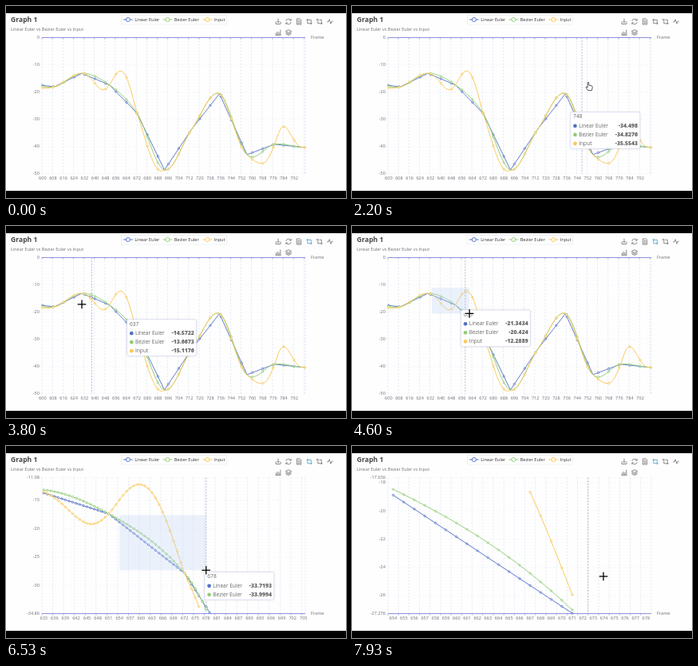
These frames come from a looping animation (426x240 px, 8 s). An HTML page with a canvas:

```html
<!DOCTYPE html>
<html lang="en">
<head>
<meta charset="utf-8">
<title>Graph 1</title>
<style>
html, body { margin: 0; width: 100%; height: 100%; overflow: hidden; background: #000; }
canvas { display: block; width: 426px; height: 240px; }
</style>
</head>
<body>
<canvas id="stage"></canvas>
<script>
const W = 426, H = 240, LOOP = 8000;
const L = 45, R = 375, T = 39.5, B = 209.5;
const FONT = '"Open Sans", "Noto Sans", sans-serif';
const BLUE = '#5470c6', GREEN = '#91cc75', YELLOW = '#fac858', GREY = '#6e7079';
const AXIS = '#8f92dc', SPLIT = '#d6def2', EDGE = '#c4c9ea';

const canvas = document.getElementById('stage');
const dpr = window.devicePixelRatio || 1;
canvas.width = W * dpr;
canvas.height = H * dpr;
const c = canvas.getContext('2d');

// Key values every 21 frames; straight lines and a spline join them.
const FIRST = 588, GAP = 21;
const keys = [-16.929, -18.0779, -13.157, -17.4026, -27.7472, -48.6496,
  -33.55, -20.6, -43.0506, -39.2, -40.3, -40.5];
const key = i => keys[Math.max(0, Math.min(keys.length - 1, i))];

function locate(frame) {
  const u = (frame - FIRST) / GAP, i = Math.floor(u);
  return [i, u - i];
}

function linear(frame) {
  const [i, t] = locate(frame);
  return key(i) + (key(i + 1) - key(i)) * t;
}

function bezier(frame) {
  const [i, t] = locate(frame), s = 1 - t;
  const slope = k => (key(k + 1) - key(k - 1)) / 2;
  return key(i) + (key(i + 1) - key(i)) * t * t * (3 - 2 * t) + slope(i) * t * s * s - slope(i + 1) * t * t * s;
}

// The input swings away from the spline between some keys.
const swings = {
  0: { size: -0.5 },
  1: { size: 0.2696 },
  2: { size: -3.625, skew: 1.85 },
  3: { size: 8.802, sharp: 1.1 },
  4: { size: -3.6 },
  7: { size: -0.7806 },
  8: { size: -4.6, skew: 1.7 },
  9: { size: 6.5, skew: 0.65, sharp: 2 }
};

function input(frame) {
  const [i, t] = locate(frame);
  const { size = 0, skew = 1, sharp = 1 } = swings[i] || {};
  return bezier(frame) + size * Math.pow(Math.sin(Math.PI * Math.pow(t, skew)), sharp);
}

const frames = Array.from({ length: 201 }, (_, i) => 600 + i);
const series = [
  { name: 'Linear Euler', color: BLUE, legend: 147, value: linear },
  { name: 'Bezier Euler', color: GREEN, legend: 196.5, value: bezier },
  { name: 'Input', color: YELLOW, legend: 246.5, value: input }
];

const views = [
  { at: 0, from: 600, to: 801, top: 0, bottom: -50, tick: 10, step: 8, marks: 8 },
  { at: 5160, grab: 4250, from: 633, to: 706, top: -11.08, bottom: -34.86, tick: 5, step: 3, marks: 1 },
  { at: 6700, grab: 6000, from: 654, to: 679, top: -17.636, bottom: -27.276, tick: 2, step: 1, marks: 1 }
];

function scale({ from, to, top, bottom }) {
  const band = (R - L) / (to - from);
  return {
    edge: f => L + (f - from) * band,
    px: f => L + (f + 0.5 - from) * band,
    py: y => T + (top - y) * (B - T) / (top - bottom),
    frameOf: x => Math.floor(from + (x - L) / band)
  };
}

function viewAt(t) {
  let i = views.length - 1;
  while (t < views[i].at) i--;
  const v = views[i], old = views[Math.max(0, i - 1)];
  const k = 1 - Math.pow(1 - Math.min(1, (t - v.at) / 220), 3);
  const mix = n => old[n] + (v[n] - old[n]) * k;
  const shown = { from: mix('from'), to: mix('to'), top: mix('top'), bottom: mix('bottom') };
  return { ...v, ...scale(shown), holds: y => y <= v.top && y >= v.bottom };
}

// Each zoom is dragged from one corner of the next view to the other.
const grabFrom = i => [scale(views[i - 1]).px(views[i].from), scale(views[i - 1]).py(views[i].top)];
const grabTo = i => [scale(views[i - 1]).px(views[i].to - 1), scale(views[i - 1]).py(views[i].bottom)];
const ZOOM_TOOL = [380, 21], ZOOM_ON = 2900;

const stop = (t, [x, y], hold = 0) => hold ? [{ t, x, y }, { t: t + hold, x, y }] : [{ t, x, y }];
const path = [
  stop(350, [30, 146]),
  stop(930, [71, 111.5]),
  stop(1700, [190, 185]),
  stop(2200, [296, 97]),
  stop(2700, ZOOM_TOOL, 300),
  stop(3500, [190, 117]),
  stop(3800, [95, 98]),
  stop(4050, grabFrom(1), 200),
  stop(5130, grabTo(1), 320),
  stop(5850, grabFrom(2), 150),
  stop(6425, grabTo(2), 1360),
  stop(7930, [315, 163])
].flat();

function cursorAt(t) {
  let i = 0;
  while (i < path.length - 2 && t >= path[i + 1].t) i++;
  const a = path[i], b = path[i + 1];
  const k = Math.min(1, Math.max(0, (t - a.t) / (b.t - a.t)));
  return { x: a.x + (b.x - a.x) * k, y: a.y + (b.y - a.y) * k };
}

function text(str, x, y, size, color = GREY, align = 'left', weight = 400) {
  c.font = `${weight} ${size}px ${FONT}`;
  c.fillStyle = color;
  c.textAlign = align;
  c.textBaseline = 'middle';
  c.fillText(str, x, y);
}

function line(x0, y0, x1, y1, color, width = 0.6, dash = []) {
  c.strokeStyle = color;
  c.lineWidth = width;
  c.setLineDash(dash);
  c.beginPath();
  c.moveTo(x0, y0);
  c.lineTo(x1, y1);
  c.stroke();
  c.setLineDash([]);
}

function ring(x, y, r, color) {
  c.beginPath();
  c.arc(x, y, r, 0, 7);
  c.fillStyle = '#fff';
  c.fill();
  c.strokeStyle = color;
  c.lineWidth = 0.95;
  c.stroke();
}

// Toolbox icons, six to a row
const icons = [
  'M-3 0V3H3V0M0-3.8V1.2M-1.7-.6L0 1.2L1.7-.6',
  'M-3.2-.6A3.2 3.2 0 0 1 2.8-1.6M3.2-3.6V-1.4H1M3.2.6A3.2 3.2 0 0 1-2.8 1.6M-3.2 3.6V1.4H-1',
  'M-2.6-3.6H1.2L2.6-2.2V3.6H-2.6ZM-1.4-1.2H1.4M-1.4.4H1.4M-1.4 2H1.4',
  'M-3.6-2.2H2.3V3.6M-2.2-3.6V2.3H3.6',
  'M-.5-2.2H2.3V3.6M-2.2-1V2.3H3.6M-3.6-2.4H-1M-2.6-3.6L-3.8-2.4L-2.6-1.2',
  'M-3.7.4H-2L-.8-2.8L1 2.8L2.1-.3H3.7',
  'M-3.4 3.4H3.6M-2.6 3V.4M-.8 3V-1.2M1 3V-.2M2.8 3V-3.4',
  'M0-3.3L3.6-1.5L0 .3L-3.6-1.5ZM-3.6.2L0 2L3.6.2M-3.6 1.7L0 3.5L3.6 1.7'
].map(d => new Path2D(d));

function header(t) {
  text('Graph 1', 6, 18, 8.6, '#464646', 'left', 700);
  text('Linear Euler vs Bezier Euler vs Input', 6, 29.3, 5.5);
  c.strokeStyle = '#e4e6f2';
  c.lineWidth = 0.6;
  c.strokeRect(144.5, 11.5, 132, 11.5);
  for (const s of series) {
    line(s.legend, 17, s.legend + 11.8, 17, s.color, 0.95);
    ring(s.legend + 5.9, 17, 2.5, s.color);
    text(s.name, s.legend + 14.2, 17.2, 5.6, '#333');
  }
  icons.forEach((shape, i) => {
    c.save();
    c.translate(341 + 13 * (i % 6), 19.5 + 13.5 * Math.floor(i / 6));
    c.strokeStyle = i === 3 && t > ZOOM_ON ? '#3e98c5' : '#666';
    c.lineWidth = 0.75;
    c.stroke(shape);
    c.restore();
  });
}

function valueTicks({ top, bottom, tick }) {
  const ticks = [top];
  for (let y = Math.ceil(top / tick - 1) * tick; y > bottom; y -= tick) ticks.push(y);
  return [...ticks, bottom];
}

function axes(v) {
  const base = v.top === 0 ? T : B;
  for (const y of valueTicks(v)) {
    const py = v.py(y);
    if (py < T - 1 || py > B + 1) continue;
    line(L, py, R, py, '#eceff7', 0.5, [2, 2]);
    text(y, 42, py, 5.6, GREY, 'right');
  }
  for (let f = v.from; f < v.to; f += v.step) {
    const x = v.edge(f);
    if (x < L - 1 || x > R + 1) continue;
    line(x, T, x, B, SPLIT, 0.7, [2, 2]);
    line(x, base, x, base + 2.3, AXIS, 0.6);
    if (v.px(f) < R - 1) text(f, v.px(f), 215.3, 5.6, GREY, 'center');
  }
  line(R, T, R, B, SPLIT, 0.7, [2, 2]);
  line(L, base, R, base, AXIS, 1);
  text('Frame', 382, base, 5.6);
}

function curves(v, hover) {
  c.save();
  c.beginPath();
  c.rect(L - 2, T - 2, R - L + 4, B - T + 4);
  c.clip();
  for (const s of series) {
    const pts = frames.map(f => [f, s.value(f)])
      .filter(([f, y]) => f >= v.from && f < v.to && v.holds(y));
    c.beginPath();
    pts.forEach(([f, y]) => c.lineTo(v.px(f), v.py(y)));
    c.strokeStyle = s.color;
    c.lineWidth = 0.95;
    c.lineJoin = 'bevel';
    c.stroke();
    for (const [f, y] of pts) {
      if (f === hover) ring(v.px(f), v.py(y), 1.5, s.color);
      else if ((f - v.from) % v.marks === 0) ring(v.px(f), v.py(y), 1.1, s.color);
    }
  }
  c.restore();
}

function tooltip(v, frame, x, y) {
  const rows = series.filter(s => v.holds(s.value(frame)));
  if (!rows.length) return;
  c.save();
  c.shadowColor = 'rgba(0,0,0,.12)';
  c.shadowBlur = 3 * dpr;
  c.fillStyle = '#fff';
  c.beginPath();
  c.roundRect(x, y, 87, 12.6 + 11 * rows.length, 1.9);
  c.fill();
  c.restore();
  c.strokeStyle = EDGE;
  c.lineWidth = 0.5;
  c.stroke();
  text(frame, x + 3.5, y + 6, 6.6, '#666');
  rows.forEach((s, i) => {
    const ry = y + 17.3 + 11 * i;
    c.fillStyle = s.color;
    c.beginPath();
    c.arc(x + 5.7, ry, 2.35, 0, 7);
    c.fill();
    text(s.name, x + 10.4, ry, 6.6, '#666');
    text(+s.value(frame).toFixed(4), x + 84.3, ry, 6.9, '#666', 'right', 800);
  });
}

const arrow = new Path2D('M0 0V8.2L1.9 6.5L3.2 9.3L4.6 8.7L3.3 5.9H5.8Z');
const hand = new Path2D('M-1-1C-1-2 .6-2 .6-1V2.2L4.2 3C5 3.2 5.2 3.8 5.1 4.5L4.4 8.6H-.4L-3 5.2C-3.4 4.4-2.4 3.8-1.8 4.4L-1 5.2Z');

function pointer(t, p, inside) {
  if (t > ZOOM_ON && inside) {
    for (const [color, w, r] of [['#fff', 2.4, 5.8], ['#000', 1.3, 5.3]]) {
      line(p.x - r, p.y, p.x + r, p.y, color, w);
      line(p.x, p.y - r, p.x, p.y + r, color, w);
    }
    return;
  }
  const shape = t > 2100 && t < 3150 ? hand : arrow;
  c.save();
  c.translate(p.x, p.y);
  c.fillStyle = '#fff';
  c.strokeStyle = '#333';
  c.lineWidth = 0.8;
  c.fill(shape);
  c.stroke(shape);
  c.restore();
}

const inGrid = p => p.x > L && p.x < R && p.y > T && p.y < B;

function draw(t) {
  c.setTransform(dpr, 0, 0, dpr, 0, 0);
  c.fillStyle = '#000';
  c.fillRect(0, 0, W, H);
  c.fillStyle = '#fefefe';
  c.fillRect(0, 9, W, 222);

  // The axis pointer trails the cursor a little, the tooltip more.
  const v = viewAt(t), p = cursorAt(t), near = cursorAt(t - 35), late = cursorAt(t - 150);
  const present = t >= path[0].t;
  const active = present && inGrid(p) && inGrid(near);
  const frame = active ? v.frameOf(near.x) : -1;

  header(t);
  axes(v);
  curves(v, frame);

  const drag = views.find(w => t > w.grab && t < w.at);
  if (drag) {
    const a = cursorAt(drag.grab);
    c.fillStyle = 'rgba(190,210,240,.3)';
    c.fillRect(a.x, a.y, p.x - a.x, p.y - a.y);
  }
  if (active) {
    const x = (v.px(frame) + v.px(v.frameOf(cursorAt(t - 45).x))) / 2;
    line(x, T, x, B, '#a3a9bb', 0.8, [2, 1.6]);
    tooltip(v, frame, late.x + 9.4, late.y + 9.4);
  }
  if (present) pointer(t, p, inGrid(p));
}

const start = performance.now();
function tick() {
  draw((performance.now() - start) % LOOP);
  requestAnimationFrame(tick);
}
tick();
</script>
</body>
</html>
```
